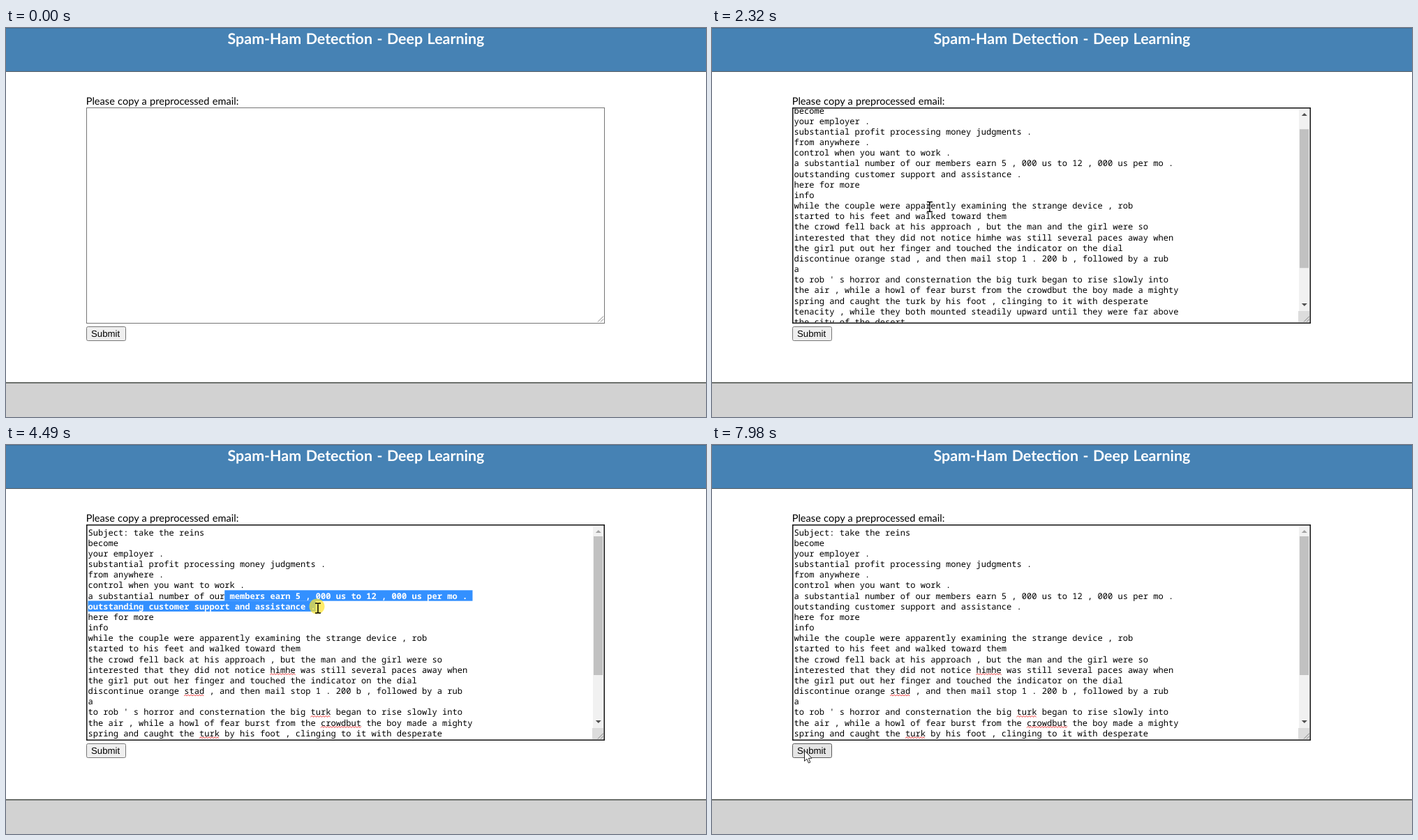
Recreate the animation shown at these times as an HTML page with a canvas. Size 1003x558 px, loop 8 s.

```html
<!DOCTYPE html>
<html lang="en">
<head>
<meta charset="utf-8">
<title>Spam-Ham Detection</title>
<style>
html, body { margin: 0; width: 100%; height: 100%; overflow: hidden; background: #fff; }
canvas { display: block; width: 1003px; height: 558px; }
</style>
</head>
<body>
<canvas id="stage" width="1003" height="558"></canvas>
<script>
const ctx = document.getElementById('stage').getContext('2d');
const LOOP = 8000, STEP = 77.7, BLINK = 545;
const LEFT = 117.5, TOP = 117.5, CHAR = 7.25, ROW = 15.17, MAX_SCROLL = 90;
const BOX = { x: 115, y: 114, w: 743, h: 310 };

// Event times in ms
const ENTER = 210, FOCUS = 760, PASTE = 1610, SPELL = 2780;
const DRAG = 3785, RELEASE = 5105, CLEAR = 7185, CLICK_TIME = 80;
const ANCHOR = { row: 6, col: 27 };

const LINES = `Subject: take the reins
become
your employer .
substantial profit processing money judgments .
from anywhere .
control when you want to work .
a substantial number of our members earn 5 , 000 us to 12 , 000 us per mo .
outstanding customer support and assistance .
here for more
info
while the couple were apparently examining the strange device , rob
started to his feet and walked toward them
the crowd fell back at his approach , but the man and the girl were so
interested that they did not notice himhe was still several paces away when
the girl put out her finger and touched the indicator on the dial
discontinue orange stad , and then mail stop 1 . 200 b , followed by a rub
a
to rob ' s horror and consternation the big turk began to rise slowly into
the air , while a howl of fear burst from the crowdbut the boy made a mighty
spring and caught the turk by his foot , clinging to it with desperate
tenacity , while they both mounted steadily upward until they were far above
the city of the desert
the big turk screamed pitifully at first , and then actually fainted away
from frightrob was much frightened , on his part , for he knew if his hands
slipped from their hold he would fall to his death`.split('\n');
const MISSPELT = /\b(himhe|stad|turk|crowdbut)\b/g;

// Pointer gestures: each eases from wherever the last one stopped.
const MOVES = [
  { from: ENTER, to: 690, x: 204, y: 182 },
  { from: 2000, to: 2460, x: 349, y: 282 },
  { from: 2600, to: 3380, x: 327, y: 222 },
  { from: 3400, to: 3620, x: 317, y: 217 },
  { from: 3810, to: 4480, x: 447, y: 234 },
  { from: 4570, to: 4810, x: 437, y: 234 },
  { from: RELEASE, to: 5510, x: 418, y: 219 },
  { from: 5600, to: 6090, x: 359, y: 272 },
  { from: 6110, to: 6420, x: 317, y: 327 },
  { from: 6450, to: 7030, x: 175, y: 405 },
  { from: CLEAR + CLICK_TIME, to: 7750, x: 132, y: 437.5 }
];

function ease(t, from, to) {
  const u = Math.min(1, Math.max(0, (t - from) / (to - from)));
  return u * u * (3 - 2 * u);
}

function pointerAt(t) {
  let x = 330, y = 300;
  for (const m of MOVES) {
    const e = ease(t, m.from, m.to);
    x += (m.x - x) * e;
    y += (m.y - y) * e;
  }
  return { x, y };
}

// Pointer and scroll advance in discrete ticks, as in a screen recording.
const tick = t => ENTER + Math.floor((t - ENTER + 8) / STEP) * STEP;

function rect(color, x, y, w, h) {
  ctx.fillStyle = color;
  ctx.fillRect(x, y, w, h);
}

function poly(points, x, y) {
  ctx.beginPath();
  points.forEach(([px, py]) => ctx.lineTo(x + px, y + py));
}

function label(text, x, y, font, color, align = 'left', gap = 0) {
  ctx.font = font;
  ctx.fillStyle = color;
  ctx.textAlign = align;
  ctx.wordSpacing = gap + 'px';
  ctx.fillText(text, x, y);
}

function drawPage() {
  rect('#fff', 0, 0, 1003, 558);
  rect('#4682b4', 0, 0, 1003, 62);
  rect('#3f6f98', 0, 0, 1003, 1);
  rect('#555b60', 0, 62, 1003, 1);
  rect('#d2d2d2', 0, 508, 1003, 50);
  rect('#5a5f5a', 0, 508, 1003, 1.7);
  label('Spam-Ham Detection - Deep Learning', 501.5, 22.5,
    'bold 21.45px Lato, Carlito, sans-serif', '#fff', 'center', 1.24);
  label('Please copy a preprocessed email:', 114.7, 110,
    '14.6px Lato, Carlito, sans-serif', '#000', 'left', 0.5);
}

function drawButton(hover) {
  ctx.beginPath();
  ctx.roundRect(115.5, 428.5, 56, 20, 2);
  ctx.fillStyle = hover ? '#e5e5e5' : '#efefef';
  ctx.fill();
  ctx.strokeStyle = hover ? '#5a5a5a' : '#767676';
  ctx.lineWidth = 1;
  ctx.stroke();
  label('Submit', 122, 443, '13.2px "Liberation Sans", Arial, sans-serif', '#000');
}

function drawBox(focused) {
  const { x, y, w, h } = BOX, b = focused ? 1.5 : 1;
  rect(focused ? '#101010' : '#767676', x, y, w, h);
  rect('#fff', x + b, y + b, w - 2 * b, h - 2 * b);
}

function drawArrowhead(y, dir, color) {
  poly([[-4, -2 * dir], [0, 2 * dir], [4, -2 * dir]], 848.8, y);
  ctx.fillStyle = color;
  ctx.fill();
}

function drawScrollbar(scroll) {
  rect('#f1f1f1', 841, 116, 15, 290);
  rect('#c1c1c1', 842, 131 + scroll * 0.643, 13, 199);
  drawArrowhead(124, -1, scroll > 0 ? '#505050' : '#a3a3a3');
  drawArrowhead(397, 1, '#505050');
  rect('#dcdcdc', 840, 406, 16, 16);
}

function drawGrip() {
  ctx.strokeStyle = '#808080';
  ctx.lineWidth = 1;
  for (const d of [8, 4]) {
    poly([[-d, 0], [0, -d]], 856, 421.5);
    ctx.stroke();
  }
}

function cellAt({ x, y }) {
  const row = Math.floor((y - TOP) / ROW);
  return { row, col: Math.min(Math.round((x - LEFT) / CHAR), LINES[row].length) };
}

function selectedSpan(row, end) {
  if (!end || row < ANCHOR.row || row > end.row) return [0, 0];
  return [
    row === ANCHOR.row ? ANCHOR.col : 0,
    row === end.row ? end.col : LINES[row].length + 1
  ];
}

function squiggle(x, y, w) {
  ctx.strokeStyle = '#f03030';
  ctx.lineWidth = 1;
  ctx.beginPath();
  for (let i = 0; i <= w; i += 2) ctx.lineTo(x + i, y + (i % 4 ? -1 : 1));
  ctx.stroke();
}

function drawText(scroll, end, spelling) {
  const mono = '12.08px "Noto Sans Mono", "DejaVu Sans Mono", monospace';
  LINES.forEach((line, row) => {
    const y = TOP + row * ROW - scroll;
    const [from, to] = selectedSpan(row, end);
    if (to > from) rect('#3390ff', LEFT + from * CHAR, y - 0.2, (to - from) * CHAR, ROW + 0.2);
    [...line].forEach((ch, i) => {
      const on = i >= from && i < to;
      label(ch, LEFT + i * CHAR, Math.round(y + 12.1), (on ? '600 ' : '') + mono, on ? '#fff' : '#000');
    });
    if (!spelling) return;
    for (const m of line.matchAll(MISSPELT)) {
      squiggle(LEFT + m.index * CHAR, y + 14, m[0].length * CHAR);
    }
  });
}

function drawCaret({ row, col }, scroll) {
  rect('#000', Math.round(LEFT + col * CHAR), TOP + row * ROW - scroll, 1, 14.5);
}

function drawBeam(x, y) {
  ctx.strokeStyle = '#000';
  ctx.lineWidth = 1.5;
  for (const s of [-1, 1]) {
    poly([[-4, 7 * s], [-1, 7 * s], [0, 6 * s], [1, 7 * s], [4, 7 * s]], x, y);
    ctx.moveTo(x, y);
    ctx.lineTo(x, y + 6.5 * s);
    ctx.stroke();
  }
}

function drawArrow(x, y) {
  poly([[0.5, 0.5], [0.5, 16], [4, 12.8], [6.4, 18.6], [8.8, 17.6], [6.4, 11.9], [11, 11.7]], x, y);
  ctx.closePath();
  ctx.fillStyle = '#fff';
  ctx.fill();
  ctx.strokeStyle = '#222';
  ctx.lineWidth = 1;
  ctx.stroke();
}

function drawPointer({ x, y }, pressed) {
  if (pressed) {
    ctx.beginPath();
    ctx.arc(x - 1.5, y - 2.5, 11, 0, Math.PI * 2);
    ctx.fillStyle = 'rgba(255, 228, 40, 0.7)';
    ctx.fill();
  }
  if (y < BOX.y + BOX.h) drawBeam(x, y);
  else drawArrow(x, y);
}

function render(t) {
  const q = tick(t);
  const pointer = pointerAt(q);
  const scroll = MAX_SCROLL * (1 - ease(q, 1990, 2460));
  const within = (from, to) => t >= from && t < to;

  drawPage();
  drawButton(pointer.x < 172 && pointer.y > 428);
  drawBox(t >= FOCUS);

  if (t >= PASTE) {
    const end = within(DRAG, CLEAR) ? cellAt(pointerAt(Math.min(q, RELEASE))) : null;
    ctx.save();
    ctx.beginPath();
    ctx.rect(116.5, 115.5, 723.5, 307);
    ctx.clip();
    drawText(scroll, end, t >= SPELL);
    if (within(PASTE, PASTE + BLINK)) drawCaret({ row: LINES.length, col: 0 }, scroll);
    if (within(CLEAR, CLEAR + BLINK)) drawCaret(cellAt(pointerAt(CLEAR)), scroll);
    ctx.restore();
    drawScrollbar(scroll);
  } else if (within(FOCUS, FOCUS + BLINK)) {
    drawCaret({ row: 0, col: 0 }, 0);
  }
  drawGrip();

  const click = from => within(from, from + CLICK_TIME);
  if (t >= ENTER) drawPointer(pointer, click(FOCUS) || within(DRAG, RELEASE) || click(CLEAR));
}

ctx.textRendering = 'geometricPrecision';
const start = performance.now();
function loop() {
  render((performance.now() - start) % LOOP);
  requestAnimationFrame(loop);
}
loop();
</script>
</body>
</html>
```
